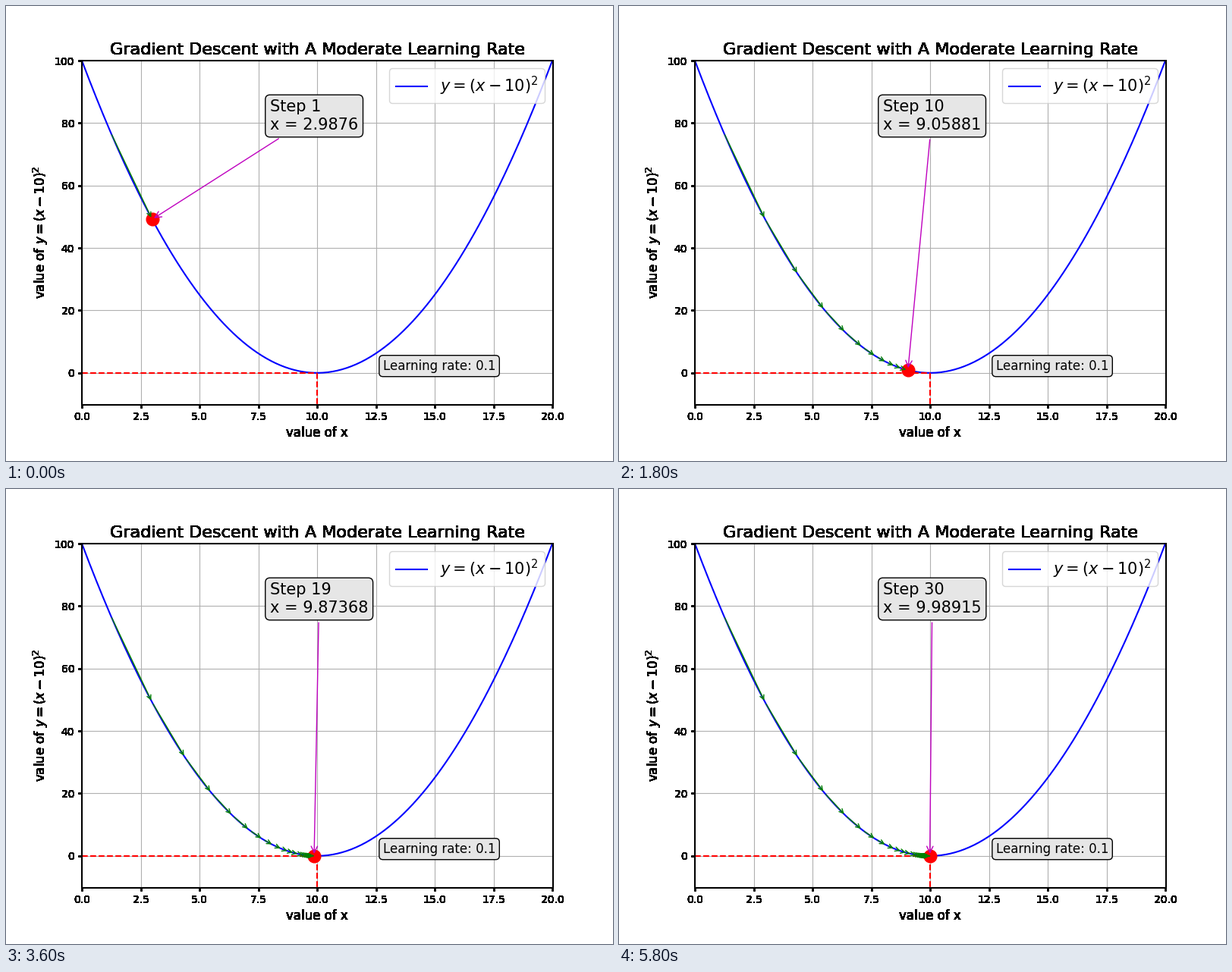
Write a matplotlib script that moves like this. It is 800 by 600 pixels and loops after 6 s.

```python
import numpy as np
import matplotlib.pyplot as plt
from matplotlib.animation import FuncAnimation

plt.rcParams["font.family"] = "DejaVu Sans"

STEPS = 30
RATE = 0.1
START = 1.2345
LAYERS = 60


def f(x):
    return (x - 10) ** 2


def saturate(img, dpi):
    """Darken soft edges as if the artist were painted many times."""
    out = np.zeros_like(img)
    out[..., 3] = 1 - (1 - img[..., 3]) ** LAYERS
    return out, 0, 0


def make_axes(fig):
    ax = fig.add_axes([0.125, 0.125, 0.775, 0.755])
    ax.set_xlim(0, 20)
    ax.set_ylim(-10, 100)
    ax.set_xticks(np.arange(0, 20.1, 2.5))
    ax.set_yticks(range(0, 101, 20))
    ax.set_title("Gradient Descent with A Moderate Learning Rate", fontsize=16)
    ax.set_xlabel("value of x", fontsize=12)
    ax.set_ylabel("value of $y=(x-10)^2$", fontsize=12)
    return ax


path = [START]
for _ in range(STEPS):
    path.append(path[-1] - RATE * 2 * (path[-1] - 10))

fig = plt.figure(figsize=(8, 6), dpi=100)

# The back axes carry the heavy black frame and lettering.
back = make_axes(fig)
for artist in (back.xaxis, back.yaxis, back.title, *back.spines.values()):
    artist.set_agg_filter(saturate)

ax = make_axes(fig)
ax.grid(True)
xs = np.linspace(0, 20, 200)
ax.plot(xs, f(xs), "b", label="$y=(x-10)^2$")
ax.plot([0, 10], [0, 0], "r--")
ax.plot([10, 10], [0, -10], "r--")
ax.legend(loc="upper right", fontsize=15)

box = dict(boxstyle="round", fc="0.9")
ax.text(12.8, 1, f"Learning rate: {RATE}", fontsize=12, bbox=box)
dot, = ax.plot([], [], "ro", markersize=12)

arrows = [
    ax.annotate("", xy=(b, f(b)), xytext=(a, f(a)),
                arrowprops=dict(arrowstyle="->", color="g"))
    for a, b in zip(path, path[1:])
]
note = ax.annotate("", xy=(0, 0), xytext=(8, 78), fontsize=15, bbox=box,
                   arrowprops=dict(arrowstyle="->", color="m"))


def update(i):
    x = path[i + 1]
    dot.set_data([x], [f(x)])
    note.xy = (x, f(x))
    note.set_text(f"Step {i + 1}\nx = {round(x, 5)}")
    for k, arrow in enumerate(arrows):
        arrow.set_visible(k <= i)
    return [dot, note, *arrows]


anim = FuncAnimation(fig, update, frames=STEPS, interval=200,
                     repeat=True, repeat_delay=0, blit=False)
plt.show()
```
